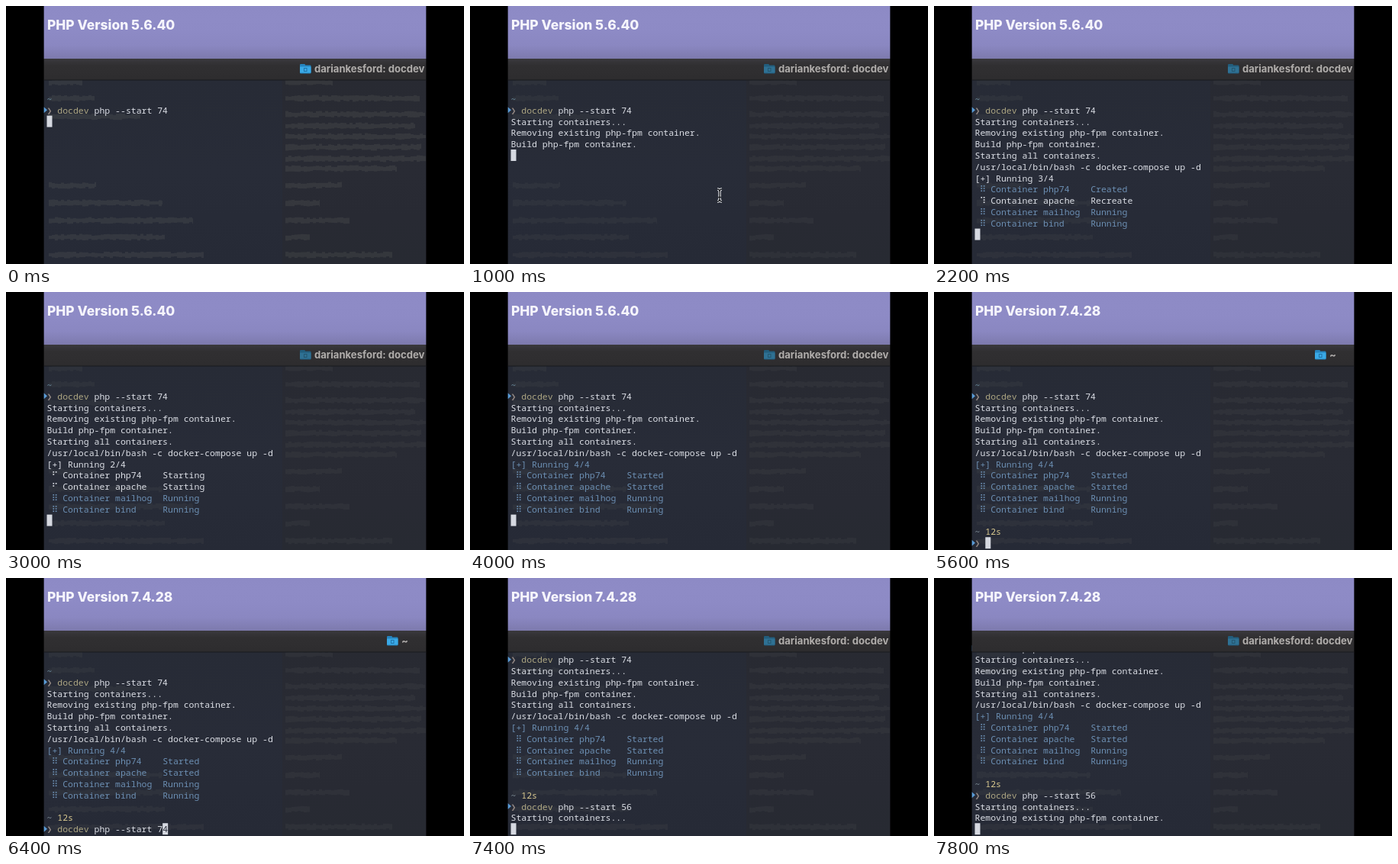
An HTML page with a canvas that plays this animation: 600 by 338 pixels, repeating every 8000 ms.

```html
<!DOCTYPE html>
<html lang="en">
<head>
<meta charset="utf-8">
<title>Switching PHP versions</title>
<style>
  html, body { margin: 0; width: 100%; height: 100%; overflow: hidden; background: #000; }
  canvas { display: block; }
</style>
</head>
<body>
<canvas id="stage" width="600" height="338"></canvas>
<script>
const LOOP = 8000, STEP = 200;
const X = 49.4, W = 501.2;
const CHAR = 6.894, LINE = 14.8, LEFT = 53.5, BASE = 126, LAST_ROW = 14;
const MONO = '"Noto Sans Mono", "DejaVu Sans Mono", monospace';
const WHITE = '#dcdfe6', BLUE = '#6c8fb3', TAN = '#aea783', SAND = '#d8c88f';
const c = document.getElementById('stage').getContext('2d');

function box(x, y, w, h, fill) {
  c.fillStyle = fill;
  c.fillRect(x, y, w, h);
}

function label(text, x, y, font, fill) {
  c.font = font;
  c.fillStyle = fill;
  c.fillText(text, x, y);
}

function fade(y0, y1, ...colors) {
  const g = c.createLinearGradient(0, y0, 0, y1);
  colors.forEach((color, i) => g.addColorStop(i / (colors.length - 1), color));
  return g;
}

// Terminal content: rows of [column, text, colour] pieces plus the cursor cell.
function terminal(t) {
  const rows = [];
  const add = (...pieces) => rows.push(pieces);
  const say = (from, text) => { if (t >= from) add([0, text, WHITE]); };
  const prompt = text => add([0, '❯', '#928783'], [2, text.slice(0, 6), TAN], [8, text.slice(6), WHITE]);

  add([0, '~', '#6f93a5']);
  prompt('docdev php --start 74');
  say(200, 'Starting containers...');
  say(600, 'Removing existing php-fpm container.');
  say(800, 'Build php-fpm container.');
  say(1400, 'Starting all containers.');
  say(1600, '/usr/local/bin/bash -c docker-compose up -d');
  if (t >= 2000) containers(t, add);
  if (t < 4600) return { rows, marks: [1], col: 0, row: rows.length };

  add();
  add([0, '~', '#8796a0'], [2, '12s', SAND]);
  const typed = t < 6200 ? '' : 'docdev php --start ' +
    (t < 6600 ? '74' : t < 6800 ? '5' : '56');
  prompt(typed);
  const marks = [1, 14];
  if (t < 7000) {
    const col = t === 6400 ? 22 : 2 + typed.length;
    return { rows, marks, col, row: 14, under: t === 6400 ? '4' : '' };
  }
  say(7200, 'Starting containers...');
  say(7600, 'Removing existing php-fpm container.');
  return { rows, marks, col: 0, row: rows.length };
}

function containers(t, add) {
  const php = t < 2800 ? 'Created' : t < 3400 ? 'Starting' : 'Started';
  const apache = t < 2600 ? 'Recreate' : t < 2800 ? 'Recreated' : t < 3600 ? 'Starting' : 'Started';
  const list = [['php74', php], ['apache', apache], ['mailhog', 'Running'], ['bind', 'Running']];
  const busy = state => state === 'Recreate' || state === 'Starting';
  const done = list.filter(([, state]) => !busy(state)).length;
  add([0, `[+] Running ${done}/4`, done === 4 ? BLUE : WHITE]);
  for (const [name, state] of list) {
    const color = busy(state) ? WHITE : BLUE;
    const icon = busy(state) ? '⠋⠙⠹⠸⠼⠴⠦⠧⠇⠏'[t / 100 % 10] : '⠿';
    add([0.9, icon, color], [3, 'Container ' + name, color], [22, state, color]);
  }
}

function drawPage(t) {
  box(X, 0, W, 69, fade(0, 69, '#8d8ac5', '#8e8bc6', '#8d8ac5', '#8a87c1', '#7d7aad'));
  label('PHP Version ' + (t < 5000 ? '5.6.40' : '7.4.28'), 54, 31,
    '800 17.4px Inter, sans-serif', '#f6f5fc');
}

function drawTitleBar(t) {
  box(X, 69, W, 28, fade(69, 97, '#3a393d', '#302f31', '#2f2e30', '#2d2c2e'));
  box(X, 96.5, W, 1, '#191a1f');
  const home = t >= 4600 && t < 7000;
  const x = home ? 518 : 404;
  label(home ? '~' : 'dariankesford: docdev', x, 87, '700 13.1px Inter, sans-serif', '#b0adab');
  const bright = home || t < 200;
  c.fillStyle = bright ? '#2583bd' : '#225d7c';
  c.beginPath();
  c.roundRect(x - 19, 76, 7, 6, 1.2);
  c.roundRect(x - 19, 77.5, 14.5, 11, 1.2);
  c.fill();
  box(x - 19, 79.5, 14.5, 8, bright ? '#3aa9e6' : '#2f7193');
  c.strokeStyle = bright ? '#2073a8' : '#24566f';
  c.lineWidth = 1;
  c.strokeRect(x - 13.5, 81.5, 3.5, 4);
}

// Ragged, blurred lines of another window shining through.
function drawBackdrop(t) {
  box(X, 97, W, 241, fade(97, 338, '#272b36', '#282c38', '#262a36'));
  box(362, 97, X + W - 362, 241, 'rgba(46,44,38,.2)');
  let seed = 7;
  const random = () => (seed = seed * 16807 % 2147483647) / 2147483647;
  c.fillStyle = t < 200 ? 'rgba(150,150,135,.13)' : 'rgba(140,142,132,.08)';
  c.filter = 'blur(0.7px)';
  const smear = (x, y, w) => {
    c.beginPath();
    for (let i = 0; i < w; i += 4) {
      const up = 2 + random() * 2.5, down = 2 + random() * 2.5;
      c.rect(x + i, y - up, Math.min(4, w - i), up + down);
    }
    c.fill();
  };
  const left = [[100, 44], [121, 60], [145, 120], [235, 62], [258, 149], [281, 189], [303, 152], [326, 203]];
  const right = [[100, 62], [121, 176], [142, 183], [157, 170], [171, 184], [185, 178], [200, 184], [213, 146],
    [235, 74], [258, 45], [281, 84], [303, 32], [326, 140]];
  left.forEach(([y, w]) => smear(56, y, w));
  right.forEach(([y, w]) => smear(366, y, w));
  c.filter = 'none';
}

function drawTerminal(t) {
  const { rows, marks, col, row, under } = terminal(t);
  const top = Math.max(0, row - LAST_ROW);
  const yOf = r => BASE + (r - top) * LINE;
  const font = '500 11.49px ' + MONO;
  rows.forEach((pieces, r) => {
    for (const [column, text, color] of pieces) label(text, LEFT + column * CHAR, yOf(r), font, color);
  });
  c.fillStyle = '#5a9bd6';
  for (const r of marks) {
    const y = yOf(r) - 4.5;
    c.beginPath();
    c.moveTo(49.5, y - 4);
    c.lineTo(54, y);
    c.lineTo(49.5, y + 4);
    c.fill();
  }
  const x = LEFT + col * CHAR;
  box(x, yOf(row) - 12, 7, 15, '#d6d9e1');
  if (under) label(under, x, yOf(row), font, '#282c38');
}

function drawPointer(x, y) {
  c.beginPath();
  for (const s of [-1, 1]) {
    c.moveTo(x - 3, y + s * 8);
    c.quadraticCurveTo(x, y + s * 8, x, y + s * 5);
    c.quadraticCurveTo(x, y + s * 8, x + 3, y + s * 8);
  }
  c.moveTo(x, y - 6);
  c.lineTo(x, y + 6);
  c.moveTo(x - 2, y + 2.5);
  c.lineTo(x + 2, y + 2.5);
  for (const [width, color] of [[3.4, '#e4e6ea'], [1.3, '#15171c']]) {
    c.lineWidth = width;
    c.strokeStyle = color;
    c.stroke();
  }
}

function draw(now) {
  const t = Math.floor(now % LOOP / STEP) * STEP;
  box(0, 0, 600, 338, '#000');
  c.save();
  c.beginPath();
  c.rect(X, 0, W, 338);
  c.clip();
  drawBackdrop(t);
  drawTerminal(t);
  drawPage(t);
  drawTitleBar(t);
  if (t >= 800 && t < 1600) drawPointer(327, 248);
  c.restore();
}

const start = performance.now();
function tick() {
  draw(performance.now() - start);
  requestAnimationFrame(tick);
}
tick();
</script>
</body>
</html>
```
